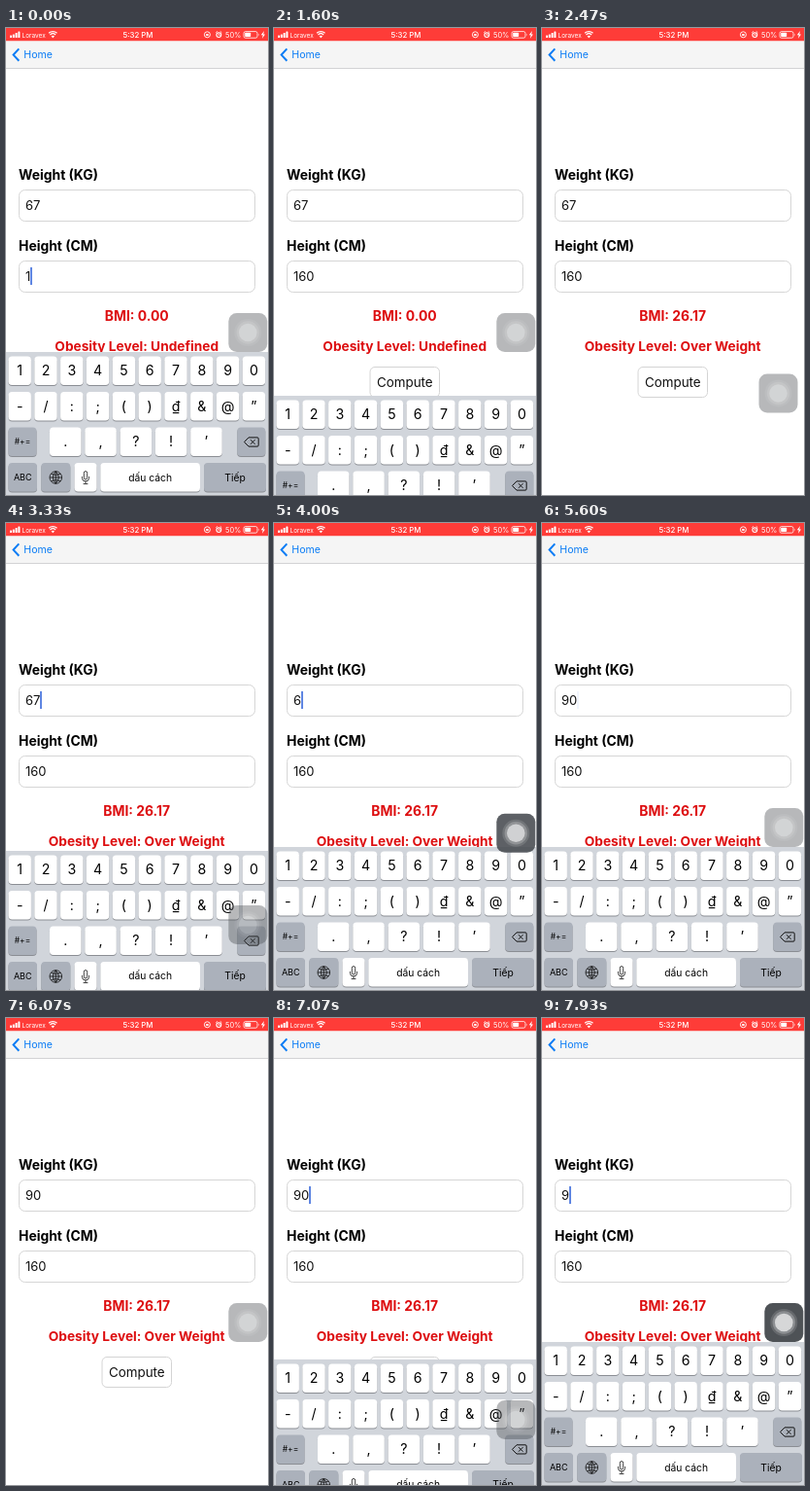
These frames come from a looping animation (270 by 480 pixels, 8000 ms). An HTML page:

```html
<!DOCTYPE html>
<html lang="en">
<head>
<meta charset="utf-8">
<title>BMI form</title>
<style>
  html, body { margin: 0; width: 100%; height: 100%; overflow: hidden; background: #fff; }
  body { position: relative; font-family: Inter, "Liberation Sans", sans-serif; }
  svg { position: absolute; left: 0; top: 0; width: 270px; height: 480px; }
  text { font-family: Inter, "Liberation Sans", sans-serif; }
  .field {
    position: absolute; left: 13px; width: 244px; height: 33px; box-sizing: border-box;
    border: 1px solid #d6d6d6; border-radius: 6.5px; padding-left: 6px;
    display: flex; align-items: center; font-size: 13px; color: #111;
  }
  .field i { width: 2px; height: 18px; margin-left: -.4px; background: #5f86e2; opacity: 0; }
  .bold { font-weight: 700; font-size: 13.9px; }
  .red { fill: #dd0e10; text-anchor: middle; }
  .status { fill: #fff; font-size: 7.8px; }
  .mid { text-anchor: middle; }
</style>
</head>
<body>
<div class="field" id="weight" style="top:165.5px"><span></span><i></i></div>
<div class="field" id="height" style="top:238.5px"><span></span><i></i></div>

<svg viewBox="0 0 270 480">
  <defs>
    <filter id="soft" x="-30%" y="-30%" width="160%" height="160%">
      <feDropShadow dx="0" dy="1" stdDeviation="1.8" flood-opacity=".3"/>
    </filter>
  </defs>

  <!-- status bar -->
  <rect width="270" height="13.5" fill="#fe3c38"/>
  <g fill="#fff">
    <rect x="4" y="7.6" width="2" height="2.4" rx=".5"/>
    <rect x="6.8" y="6.4" width="2" height="3.6" rx=".5"/>
    <rect x="9.6" y="5" width="2" height="5" rx=".5"/>
    <rect x="12.4" y="3.4" width="2" height="6.6" rx=".5"/>
    <path d="M48.3 10.3l-1.7-1.9a2.6 2.6 0 0 1 3.4 0z"/>
  </g>
  <g fill="none" stroke="#fff">
    <path d="M45.5 7a4.2 4.2 0 0 1 5.6 0M44.1 5.3a6.2 6.2 0 0 1 8.4 0" stroke-width="1.2"/>
    <circle cx="207.4" cy="6.8" r="3" stroke-width=".9"/>
    <circle cx="219.3" cy="7.1" r="2.4" stroke-width="1.1"/>
    <path d="M219.3 5.6v1.7h1.2M216.3 4.8l1.5-1.4M222.3 4.8l-1.5-1.4" stroke-width=".9"/>
    <rect x="245" y="3.6" width="14" height="6.6" rx="1.8" stroke-width=".8"/>
  </g>
  <g fill="#fff">
    <rect x="206.2" y="6.1" width="2.4" height="2" rx=".3"/>
    <rect x="246.2" y="4.8" width="6" height="4.2" rx=".8"/>
    <path d="M260 5.7q1.2 1.2 0 2.4zM266 3l-3.2 4.3h1.9L264 10.8l3-4.4h-1.8z"/>
  </g>
  <text class="status" x="16.5" y="9.5" style="font-size:6.5px">Loravex</text>
  <text class="status mid" x="136" y="9.8" font-weight="500">5:32 PM</text>
  <text class="status" x="226" y="9.7" style="font-size:7.4px">50%</text>

  <!-- navigation bar -->
  <rect y="13.5" width="270" height="27.8" fill="#f5f5f5"/>
  <rect y="41" width="270" height=".8" fill="#c9c9cb"/>
  <path d="M13.3 21.4L7.6 27.6l5.7 6.2" fill="none" stroke="#0b7cf5" stroke-width="2"/>
  <text x="18.3" y="31.4" font-size="10.6" fill="#0b7cf5">Home</text>

  <!-- form -->
  <text class="bold" x="13" y="156">Weight (KG)</text>
  <text class="bold" x="13" y="229">Height (CM)</text>
  <text class="bold red" id="bmi" x="134.7" y="301.2"></text>
  <text class="bold red" id="level" x="134.7" y="331.6" style="font-size:13.7px"></text>
  <g id="compute">
    <rect x="99" y="348.5" width="71.5" height="31" rx="5" fill="#fff" stroke="#d4d4d4"/>
    <text class="mid" x="134.8" y="369" font-size="13.4" fill="#111">Compute</text>
  </g>

  <g id="keyboard"><rect y="333" width="270" height="150" fill="#d1d5db"/></g>

  <g id="popup" filter="url(#soft)">
    <path fill="#fff"/>
    <text class="mid" y="325" font-size="24"></text>
  </g>

  <!-- floating button -->
  <g id="assist">
    <rect width="40" height="40" rx="8.5" fill="#474b50"/>
    <g id="rings" fill="#fff">
      <circle cx="20" cy="20" r="14" opacity=".14"/>
      <circle cx="20" cy="20" r="11.7" opacity=".25"/>
      <circle cx="20" cy="20" r="9.3" opacity=".65"/>
    </g>
  </g>
</svg>

<script>
const LOOP = 8000, GREY = '#abb1bb';
const $ = s => document.querySelector(s);
const board = $('#keyboard'), popup = $('#popup'), assist = $('#assist'), rings = $('#rings');

function add(parent, tag, attrs, text) {
  const el = document.createElementNS('http://www.w3.org/2000/svg', tag);
  for (const k in attrs) el.setAttribute(k, attrs[k]);
  if (text) el.textContent = text;
  parent.append(el);
  return el;
}

function key(x, y, w, label, size = 14.2, fill = '#fff') {
  add(board, 'rect', { x, y: y + 1, width: w, height: 29.6, rx: 3.8, fill: '#8b8e94' });
  const cap = add(board, 'rect', { x, y, width: w, height: 29.6, rx: 3.8, fill });
  if (label) add(board, 'text', { x: x + w / 2, y: y + 14.8 + size * .36, class: 'mid', 'font-size': size }, label);
  return cap;
}

const keyX = i => 2.5 + i * 26.8;
[...'1234567890'].forEach((c, i) => key(keyX(i), 337.5, 23.4, c));
[...'-/:;()₫&@”'].forEach((c, i) => key(keyX(i), 374, 23.4, c));
key(2.5, 410.5, 29, '#+=', 8.4, GREY);
[...'.,?!’'].forEach((c, i) => key(45 + i * 36.3, 410.5, 32.5, c));
const backspace = key(238.3, 410.5, 29, '', 0, GREY);
key(2.5, 447, 29.5, 'ABC', 9, GREY);
key(36.3, 447, 30, '', 0, GREY);
key(70.5, 447, 23, '');
key(97.3, 447, 102.7, 'dấu cách', 10.3);
key(204, 447, 64, 'Tiếp', 10.3, GREY);

const line = (d, w = 1) => add(board, 'path', { d, fill: 'none', stroke: '#111', 'stroke-width': w });
line('M245.5 425.5l4.5-4.6h9q1.2 0 1.2 1.2v6.8q0 1.2-1.2 1.2h-9zM252 423.2l4.6 4.6M256.6 423.2l-4.6 4.6');
line('M45 462a6.3 6.3 0 1 0 12.6 0a6.3 6.3 0 1 0-12.6 0h12.6M51.3 455.7v12.6M51.3 455.7q-6 6.3 0 12.6q6-6.3 0-12.6M46.5 458.4q4.8 2 9.6 0M46.5 465.6q4.8-2 9.6 0', .8);
line('M78.4 461v1.4a3.6 3.6 0 0 0 7.2 0V461M82 466v2.6M79.6 468.6h4.8', .8);
line('M80.3 457.3a1.7 1.7 0 0 1 3.4 0v5a1.7 1.7 0 0 1-3.4 0z', .8);

// Last entry whose time has passed: [time, value]
const at = (list, t) => list.reduce((v, [from, value]) => t >= from ? value : v, null);
const ramp = (t, a, b) => Math.min(1, Math.max(0, (t - a) / (b - a)));
const ease = p => p * p * (3 - 2 * p);
const within = (t, spans) => spans.some(([a, b]) => t >= a && t < b);

const weightText = [[0, '67'], [3990, '6'], [4200, ''], [4660, '9'], [4800, '90'], [7870, '9']];
const heightText = [[0, '1'], [200, '16'], [600, '160']];
const presses = [[0, ''], [70, '6'], [262, ''], [530, '0'], [662, ''],
                 [4600, '9'], [4730, '0'], [4865, '']];
const deletes = [[3930, 3995], [4130, 4205], [7800, 7875]];
const slides = [[1572, 'down'], [3042, 'up'], [5642, 'down'], [6902, 'up']];

function keyboardOffset(t) {
  const slide = slides.filter(([from]) => t >= from).pop();
  if (!slide) return 0;
  const left = Math.exp(-(t - slide[0]) / 80);
  return 148 * (slide[1] === 'down' ? 1 - left : left);
}

// Caret fades out over [a, b] and back in over [c, d]
const blink = (t, a, b, c, d) => 1 - ramp(t, a, b) + ramp(t, c, d);

function weightCaret(t) {
  if (t >= 3042 && t < 5642) return blink(t, 3570, 3700, 3820, 3930) * blink(t, 5290, 5470, 5590, 5720);
  return t >= 6902 ? blink(t, 7430, 7570, 7700, 7830) : 0;
}
const heightCaret = t => t < 1572 ? blink(t, 1160, 1330, 1440, 1540) : 0;

function setField(id, text, caret) {
  $(id + ' span').textContent = text;
  $(id + ' i').style.opacity = caret;
}

function setPopup(char) {
  popup.style.display = char ? '' : 'none';
  if (!char) return;
  const x = keyX('1234567890'.indexOf(char));
  const l = Math.min(x - 9, 227), r = Math.min(x + 32.4, 268.5), k = x + 23.4;
  popup.children[0].setAttribute('d',
    `M${l + 6} 295H${r - 6}Q${r} 295 ${r} 301V322C${r} 331 ${k} 330 ${k} 340V363Q${k} 367 ${k - 4} 367` +
    `H${x + 4}Q${x} 367 ${x} 363V340C${x} 330 ${l} 331 ${l} 322V301Q${l} 295 ${l + 6} 295Z`);
  popup.children[1].setAttribute('x', (l + r) / 2);
  popup.children[1].textContent = char;
}

function setAssist(t) {
  const down = [ramp(t, 2290, 2600), ramp(t, 6370, 6600)];
  const up = [ramp(t, 3890, 4020), ramp(t, 7780, 7910)];
  const y = 293 + 100 * (ease(down[0]) + ease(down[1]) - ease(up[0]) - ease(up[1]));
  const x = 229.3 - 6 * (Math.sin(Math.PI * down[0]) + Math.sin(Math.PI * down[1]));
  const dark = up[0] - ramp(t, 4060, 4270) + up[1];
  assist.setAttribute('transform', `translate(${x} ${y})`);
  assist.setAttribute('opacity', .39 + .57 * dark);
  rings.setAttribute('opacity', .5 + .5 * dark);
}

function draw(t) {
  setField('#weight', at(weightText, t), weightCaret(t));
  setField('#height', at(heightText, t), heightCaret(t));
  const done = t >= 2230;
  $('#bmi').textContent = 'BMI: ' + (done ? '26.17' : '0.00');
  $('#level').textContent = 'Obesity Level: ' + (done ? 'Over Weight' : 'Undefined');
  $('#compute').setAttribute('opacity', 1 - .8 * (ease(ramp(t, 2000, 2150)) - ease(ramp(t, 2230, 2480))));
  board.setAttribute('transform', `translate(0 ${keyboardOffset(t)})`);
  backspace.setAttribute('fill', within(t, deletes) ? '#fff' : GREY);
  setPopup(at(presses, t));
  setAssist(t);
}

const start = performance.now();
function tick() {
  draw((performance.now() - start) % LOOP);
  requestAnimationFrame(tick);
}
tick();
</script>
</body>
</html>
```
